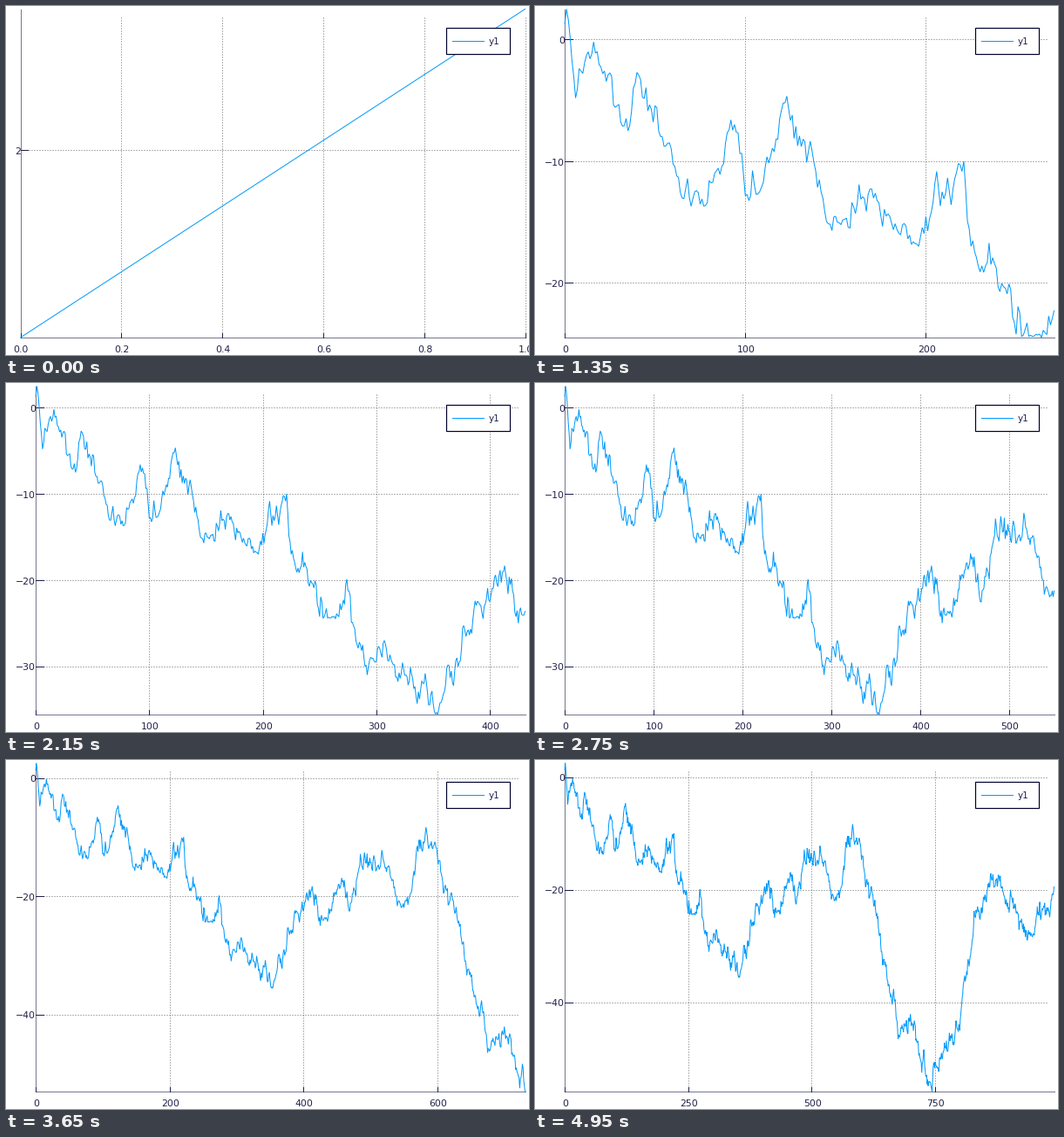
A matplotlib script for the animation above (5 s loop, 600 by 400 pixels).

```python
import math
import numpy as np
import matplotlib.pyplot as plt
from matplotlib.animation import FuncAnimation
from matplotlib.patches import Rectangle

W, H = 600, 400
RIGHT, TOP, BOTTOM = 596, 4, 380.5
FRAMES, STEP = 100, 10
PX = 0.72  # one pixel in points
NAVY, BLUE, GRID, AXIS = "#20204a", "#009afa", "#6a6a6a", "#77778f"

# Main turning points of the walk; seeded jitter fills the rest.
TURNS = [(0, 1.32), (1, 2.51), (6, -4.8), (21, -2.8), (35, -7.5), (40, -2.7),
         (59, -9), (77, -13.7), (92, -6.6), (108, -12.5), (124, -5.7),
         (148, -15.7), (169, -12.3), (196, -17), (221, -10), (225, -17),
         (264, -24.5), (273, -20.5), (292, -31), (307, -27), (354, -35.6),
         (380, -26), (410, -20.3), (425, -25), (461, -17.3), (468, -22.5),
         (491, -12.6), (528, -15), (545, -21.5), (560, -19.5), (575, -10.5),
         (603, -14), (675, -46.5), (692, -43.2), (744, -55.85), (770, -48),
         (800, -45), (836, -23), (870, -19.5), (942, -27.5), (991, -19.5)]


def make_walk():
    knots, levels = np.array(TURNS).T
    n = np.arange(knots[-1] + 1)
    rng = np.random.default_rng(7)
    jitter = np.zeros(n.size)
    for i in range(1, n.size):
        jitter[i] = 0.75 * jitter[i - 1] + rng.normal(0, 0.85)
    jitter -= np.interp(n, knots, jitter[knots.astype(int)])
    y = np.interp(n, knots, levels) + jitter
    # Reflect at the running minimum so the jitter sets no new lows.
    floor = np.minimum.accumulate(levels)[np.searchsorted(knots, n)]
    return np.minimum(floor + np.abs(y - floor), levels.max())


def nice_ticks(lo, hi):
    """Best-scoring evenly spaced ticks that cover lo..hi, cut to the range."""
    span = hi - lo
    best, pick = -math.inf, (0, 1, 2)
    top = math.ceil(math.log10(span))
    for z in range(top, top - 3, -1):
        for k in range(2, 11):
            for q, nice in ((1, 1), (5, .9), (2, .7), (2.5, .5), (3, .2)):
                step = q * 10.0 ** z
                reach = (k - 1) * step
                r = math.ceil((hi - reach) / step)
                while r * step <= lo:
                    simple = r <= 0 and abs(r) < k
                    grain = max(0, 1 - abs(k - 5) / 5)
                    score = (grain / 4 + simple / 6 + 0.5 * span / reach
                             + nice / 4 + 1e-6 * (q == 2.5))
                    if reach >= 2 * span:
                        score -= 1000
                    if score > best + 1e-9:
                        best, pick = score, (r, step, k)
                    r += 1
    r, step, k = pick
    return [(r + i) * step for i in range(k) if lo <= (r + i) * step <= hi]


def labels_for(ticks):
    whole = all(abs(t - round(t)) < 1e-9 for t in ticks)
    return [f"{t:.{0 if whole else 1}f}".replace("-", "\u2212") for t in ticks]


def label_width(text):
    sizes = {"\u2212": 10.4, ".": 3.5}
    return sum(sizes.get(c, 7.1) for c in text)


walk = make_walk()
fig = plt.figure(figsize=(W / 100, H / 100), dpi=100, facecolor="white")
ax = fig.add_axes([0, 0, 1, 1])


def line(x, y, color, z, **kw):
    ax.plot(x, y, color=color, lw=PX, zorder=z, **kw)


def grid_line(x, y):
    line(x, y, GRID, 1, ls=(0, (1, 2)), dash_capstyle="butt")


def write(x, y, text, ha, size=7.8, z=4):
    ax.text(x, y, text, ha=ha, va="baseline", color=NAVY, fontsize=size,
            family="DejaVu Sans", zorder=z)


def draw_legend():
    ax.add_patch(Rectangle((505.5, 25), 72.5, 30, fc="white", ec="#00002d",
                           lw=PX * 1.2, zorder=6))
    line([512, 548], [40.2, 40.2], BLUE, 7)
    write(554.2, 44.8, "y1", "left", 7.5, 7)


def draw(frame):
    ax.clear()
    # Half-pixel shift: snapped lines then land on the pixel they fall in.
    ax.set(xlim=(0.5, W + 0.5), ylim=(H + 0.5, 0.5))
    ax.axis("off")

    last = STEP * frame + 1
    data = walk[:last + 1]
    lo, hi = data.min(), data.max()
    if frame:
        xticks, yticks = nice_ticks(0, last), nice_ticks(lo, hi)
    else:
        xticks, yticks = [i / 5 for i in range(6)], [2]
    ylabels = labels_for(yticks)
    left = 10 + max(map(label_width, ylabels))

    def px(x):
        return left + np.asarray(x) / last * (RIGHT - left)

    def py(y):
        return TOP + (hi - np.asarray(y)) / (hi - lo) * (BOTTOM - TOP)

    for t, text in zip(xticks, labels_for(xticks)):
        x = px(t)
        grid_line([x, x], [BOTTOM, 11])
        line([x, x], [BOTTOM, 375.5], NAVY, 3)
        write(x + 0.8, 397.5, text, "center")
    for t, text in zip(yticks, ylabels):
        y = py(t)
        grid_line([left, 588], [y, y])
        line([left, left + 8.5], [y, y], NAVY, 3)
        write(left + 0.2, y + 4.7, text, "right")

    line([left, left], [TOP, BOTTOM], AXIS, 2)
    line([left, RIGHT], [BOTTOM, BOTTOM], AXIS, 2)
    line(px(np.arange(last + 1)), py(data), BLUE, 5, solid_joinstyle="miter")
    draw_legend()
    return []


anim = FuncAnimation(fig, draw, frames=FRAMES, interval=50, init_func=lambda: [],
                     repeat=True, repeat_delay=0, blit=False)
plt.show()
```
